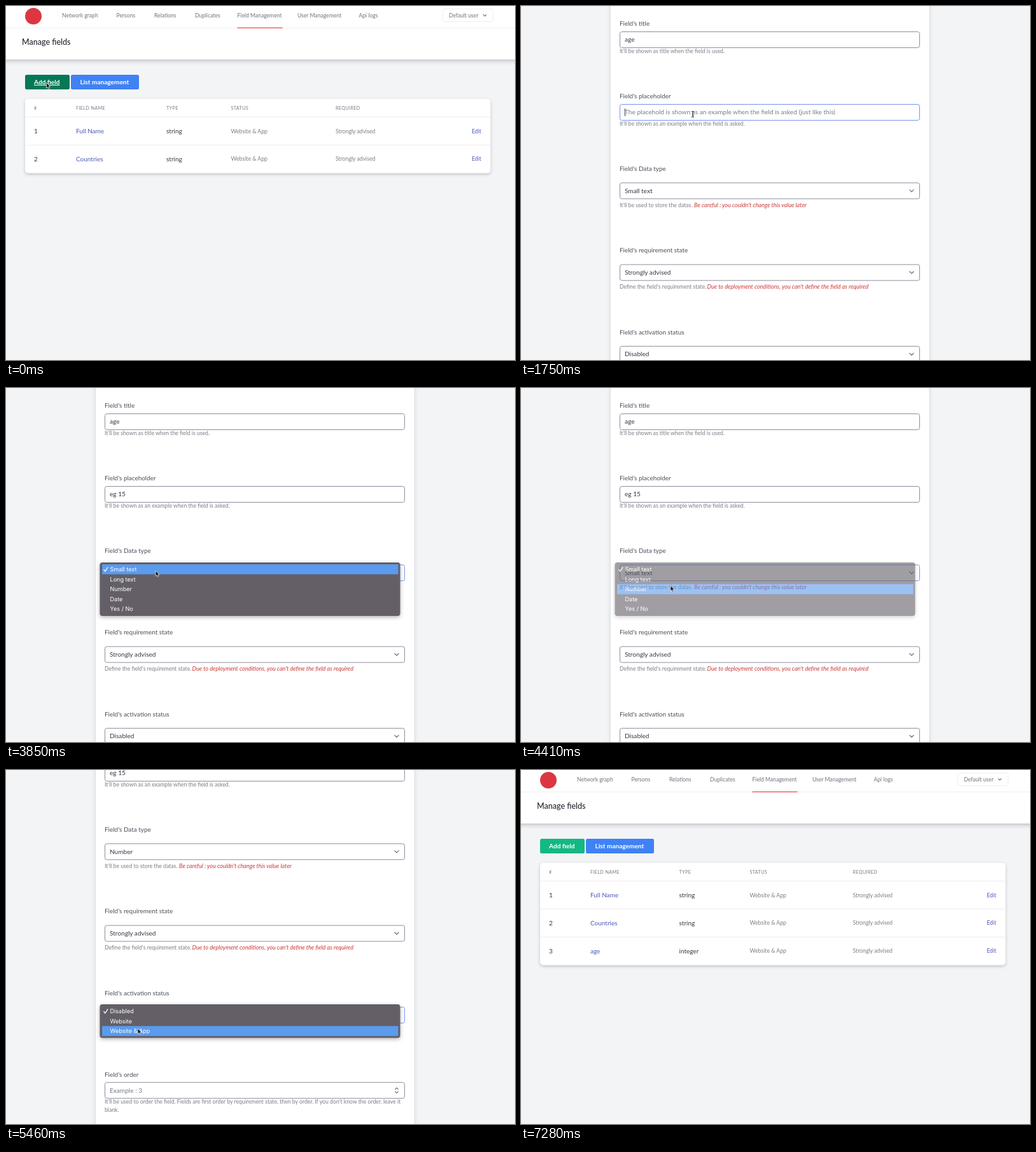
Animation of 800x556 px, one loop 7350 ms. Source, as an HTML page:

```html
<!DOCTYPE html>
<html lang="en">
<head>
<meta charset="utf-8">
<title>Manage fields</title>
<style>
html, body { margin: 0; width: 100%; height: 100%; overflow: hidden; background: #f3f4f6; }
svg { display: block; width: 800px; height: 556px; }
text { font-family: Lato, sans-serif; white-space: pre; }
.menu text { font-family: Inter, sans-serif; }
.card { fill: #fff; filter: drop-shadow(0 2px 2.5px rgba(0,0,0,.2)); }
.soft { fill: #fff; filter: drop-shadow(0 2px 3px rgba(0,0,0,.15)); }
.line { stroke: #edeef1; }
.box { fill: #fff; stroke: #8f8e9e; }
.chev { fill: none; stroke: #5f6672; stroke-width: 1.1; stroke-linecap: round; stroke-linejoin: round; }
</style>
</head>
<body>
<svg id="stage" viewBox="0 0 800 556" xmlns="http://www.w3.org/2000/svg"></svg>
<script>
const LOOP = 7350, STEP = 70;
const INK = '#343a46', LABEL = '#4a4f5a', HINT = '#7b7e87', RED = '#cb3838', LINK = '#4d56c0';
const FOCUS = '#7893ea', PAGE = '#f3f4f6';

// y is the optical middle of the line
const text = (x, y, s, size, fill, more = '') =>
  `<text x="${x}" y="${(y + size * .33).toFixed(2)}" font-size="${size}" fill="${fill}" ${more}>${s.replace(/&/g, '&amp;')}</text>`;
const rect = (x, y, w, h, r, more) =>
  `<rect x="${x}" y="${y}" width="${w}" height="${h}" rx="${r}" ${more}/>`;
const line = (x1, x2, y) => `<path class="line" d="M${x1} ${y}H${x2}"/>`;
const chevron = (x, y, w = 3.2, up = 1) =>
  `<path class="chev" d="M${x - w} ${y - up * w / 2}l${w} ${up * w} ${w} ${-up * w}"/>`;

function header(title) {
  const tabs = [['Network graph', 88], ['Persons', 173.5], ['Relations', 233], ['Duplicates', 297],
    ['Field Management', 363.5], ['User Management', 458], ['Api logs', 554.5]];
  return rect(0, 84, 800, 9, 0, 'fill="url(#shade)"') +
    rect(0, 0, 800, 84, 0, 'fill="#fff"') + line(0, 800, 34.5) +
    '<circle cx="43" cy="16" r="13" fill="#dc3740"/>' +
    tabs.map(([s, x], i) => text(x, i > 3 && i < 6 ? 14.7 : 15.6, s, 8.6, '#70747e')).join('') +
    rect(363.5, 33.6, 71, 1.5, 0, 'fill="#f0605f"') +
    rect(686.5, 4.5, 79, 20, 3, 'fill="#fff" stroke="#eceef1"') +
    text(696, 14.8, 'Default user', 8.6, '#70747e') + chevron(752.5, 14.8, 2.2) +
    text(25, 57, title, 12.5, '#23272f', 'font-weight="500"');
}

function listPage(rows, cols, hover) {
  const h = 29 + rows.length * 43.8;
  const heads = ['#', 'FIELD NAME', 'TYPE', 'STATUS', 'REQUIRED'];
  let s = header('Manage fields') +
    rect(30, 108, 70, 23, 2.5, `fill="${hover ? '#047857' : '#14b884'}"`) +
    text(44, 119.5, 'Add field', 10.1, '#fff', 'font-weight="700"' + (hover ? ' text-decoration="underline"' : '')) +
    rect(102, 108, 107, 23, 2.5, 'fill="#3f82f5"') +
    text(116.5, 119.5, 'List management', 10.1, '#fff', 'font-weight="700"') +
    rect(30, 146, 731.5, h, 5, 'class="card"');
  heads.forEach((t, i) => s += text(cols[i], 160.2, t, 7.2, '#777b85', 'letter-spacing=".36"'));
  rows.forEach(([name, type], i) => {
    const y = 196.7 + i * 43.8;
    s += line(30, 761.5, 174.5 + i * 44) +
      text(44, y, String(i + 1), 10, INK) + text(cols[1], y, name, 10, LINK) +
      text(cols[2], y, type, 10, INK) + text(cols[3], y, 'Website & App', 8.7, HINT) +
      text(cols[4], y, 'Strongly advised', 8.7, HINT) + text(732, y, 'Edit', 8.7, LINK);
  });
  return s;
}

const label = (y, s) => text(155, y, s, 9.95, LABEL);
const hint = (y, s) => text(155, y, s, 8.7, HINT);
const warn = (x, y, s) => text(x, y, s, 9.15, RED, 'font-style="italic"');
const field = (id, y, value, select) =>
  rect(155.5, y, 471, 25, 3, `class="box" id="${id}Box"`) +
  text(163, y + 12.5, value, 10.1, INK, `id="${id}"`) + (select ? chevron(614, y + 12.5) : '');
const check = y => rect(155.6, y - 4.4, 8.8, 8.8, 2.5, 'class="box"');

// Form coordinates: zero offset is the view with the title field on top
const TOP = 122;
const formPage = `<g transform="translate(0 ${-TOP})">${header('Add field')}</g>` +
  rect(141, -14, 500.5, 1004, 5, 'class="soft"') +
  label(28, "Field's title") + field('title', 40.5, '') +
  hint(71.3, "It'll be shown as title when the field is used.") +
  label(142, "Field's placeholder") + field('sample', 154.5, '') +
  hint(185, "It'll be shown as an example when the field is asked.") +
  label(256, "Field's Data type") + field('type', 277.8, 'Small text', 1) +
  hint(313.3, "It'll be used to store the datas.") +
  warn(272, 313.3, "Be careful : you couldn't change this value later") +
  label(384, "Field's requirement state") + field('need', 406.1, 'Strongly advised', 1) +
  hint(441.4, "Define the field's requirement state.") +
  warn(292.5, 441.4, "Due to deployment conditions, you can't define the field as required") +
  label(512.3, "Field's activation status") + field('status', 534.4, 'Disabled', 1) +
  hint(569.8, 'Define where the field will be deployed.') +
  warn(308.5, 569.8, "Be careful, if the status is set to 'Disabled', the field won't be shown.") +
  label(640.6, "Field's order") + field('order', 652.7, '') +
  text(163, 665.2, 'Example : 3', 10.1, '#777b85') +
  chevron(614, 668.3, 2.2) + chevron(614, 662.3, 2.2, -1) +
  hint(683.6, "It'll be used to order the field. Fields are first order by requirement state, then by order. If you don't know the order, leave it") +
  hint(695.8, 'blank.') +
  label(766.5, 'Is that a descriptive value ?') + check(783.4) +
  hint(794, 'If checked, it will be displayed in the Persons section.') +
  label(865, 'Is that the best descriptive value ?') + check(882) +
  hint(892.5, "If checked, it will be displayed as the person's title.") +
  rect(155, 949, 48, 23, 2.5, 'fill="#14b884"') +
  text(168, 960.5, 'Save', 10.1, '#fff', 'font-weight="700"') +
  '<path id="caret" stroke="#222" stroke-width=".9"/>';

const ROW = 15.6;
const menu = (id, y, items) => `<g class="menu" id="${id}">` +
  rect(147.5, y, 472, items.length * ROW + 6, 4, 'fill="#645f67" style="filter:drop-shadow(0 2px 3px rgba(0,0,0,.3))"') +
  rect(151, 0, 465.5, ROW, 0, 'fill="#5a9bee" class="mark"') +
  `<path d="M153.5 ${y + 11}l2.4 3 4.2-6.6" fill="none" stroke="#fff" stroke-width="1.3"/>` +
  items.map((s, i) => text(163.5, y + 10.9 + i * ROW, s, 9.1, '#fff')).join('') + '</g>';

const oldRows = [['Full Name', 'string'], ['Countries', 'string']];
const $ = id => document.getElementById(id);
$('stage').innerHTML =
  `<defs><linearGradient id="shade" x2="0" y2="1"><stop stop-color="#c9cacf"/><stop offset=".45" stop-color="#e4e5e8"/><stop offset="1" stop-color="${PAGE}"/></linearGradient></defs>` +
  rect(0, 0, 800, 556, 0, `fill="${PAGE}"`) +
  `<g id="before">${listPage(oldRows, [44, 110, 252, 353.5, 518], true)}</g>` +
  `<g id="after">${listPage([...oldRows, ['age', 'integer']], [44, 109, 248.5, 359.5, 521.5], false)}</g>` +
  `<g id="form">${formPage}</g>` +
  menu('typeMenu', 274, ['Small text', 'Long text', 'Number', 'Date', 'Yes / No']) +
  menu('statusMenu', 368, ['Disabled', 'Website', 'Website & App']) +
  '<path id="arrow" d="M0 0V8.6L2 6.8 3.4 9.8 4.9 9.1 3.5 6.2H6.2Z" fill="#111" stroke="#fff" stroke-width=".7"/>' +
  '<path id="beam" d="M-2 -4.6Q0 -4.6 0 -3.4Q0 -4.6 2 -4.6M0 -3.4V3.4M-2 4.6Q0 4.6 0 3.4Q0 4.6 2 4.6M-1.2 1.6H1.2" fill="none" stroke="#222" stroke-width="1"/>';

const scroll = [[0, TOP], [1330, TOP], [1540, 0], [4690, 0], [4970, -162], [5740, -162], [6090, -332], [6230, -332], [6510, -454]];
const mouse = [[0, 63.5, 120.5], [280, 63.5, 120.5], [600, 250, 175], [1330, 250, 175], [1600, 270, 170],
  [2940, 270, 170], [3150, 270.7, 169], [3640, 235, 287], [3850, 235, 287], [4200, 235, 310.5], [4690, 235, 310.5],
  [5020, 212, 379], [5180, 212, 379], [5390, 207, 406], [5670, 207, 406], [5950, 432, 396.5], [6300, 432, 396.5], [6640, 180, 505]];

const ease = p => p * p * (3 - 2 * p);
function at(keys, t) {
  const i = keys.findIndex(k => k[0] > t);
  if (i < 0) return keys[keys.length - 1].slice(1);
  const a = keys[i - 1], b = keys[i], p = ease((t - a[0]) / (b[0] - a[0]));
  return a.slice(1).map((v, n) => v + (b[n + 1] - v) * p);
}
const typed = (s, times, t) => s.slice(0, times.filter(k => t >= k).length);
const show = (id, on) => $(id).setAttribute('visibility', on ? 'visible' : 'hidden');

function setInput(id, value, placeholder) {
  $(id).textContent = value || placeholder;
  $(id).setAttribute('fill', value ? INK : '#777b85');
}

function setMenu(id, y, count, open, close, t, my) {
  const alpha = t < open ? 0 : Math.max(0, Math.min(1, (close + 150 - t) / 150));
  $(id).setAttribute('opacity', alpha);
  show(id, alpha > 0);
  const row = Math.max(0, Math.min(count - 1, Math.floor((my - y - 3) / ROW)));
  $(id).querySelector('.mark').setAttribute('y', y + 3 + row * ROW);
}

function draw(t) {
  const inForm = t >= 210 && t < 6960;
  show('before', t < 210);
  show('form', inForm);
  show('after', t >= 6960);
  $('form').setAttribute('transform', `translate(0 ${at(scroll, t)[0].toFixed(2)})`);

  const title = typed('age', [840, 980, 1120], t);
  const sample = typed('eg 15', [2450, 2590, 2660, 2870, 3010], t);
  setInput('title', title, 'The title of the field');
  setInput('sample', sample, 'The placehold is shown as an example when the field is asked (just like this)');
  $('type').textContent = t < 4480 ? 'Small text' : 'Number';
  $('status').textContent = t < 5670 ? 'Disabled' : 'Website & App';

  const focus = t < 700 ? '' : t < 1680 ? 'title' : t < 3710 ? 'sample' : t < 5110 ? 'type' : 'status';
  for (const id of ['title', 'sample', 'type', 'status'])
    $(id + 'Box').style.stroke = id === focus ? FOCUS : '';

  const value = focus === 'title' ? title : sample;
  const blink = t >= 2170 && t < 2450;
  const caretOn = inForm && (focus === 'title' || focus === 'sample') && !blink;
  show('caret', caretOn);
  if (caretOn) {
    const x = 163.4 + (value ? $(focus).getComputedTextLength() : 0);
    $('caret').setAttribute('d', `M${x.toFixed(2)} ${focus === 'title' ? 47 : 161}v12`);
  }

  const [mx, my] = at(mouse, t);
  setMenu('typeMenu', 274, 5, 3780, 4350, t, my);
  setMenu('statusMenu', 368, 3, 5110, 5530, t, my);
  const beam = t >= 560 && t < 3260;
  show('beam', beam);
  show('arrow', !beam && t < 6960);
  for (const id of ['beam', 'arrow'])
    $(id).setAttribute('transform', `translate(${mx.toFixed(2)} ${my.toFixed(2)})`);
}

const start = performance.now();
function tick() {
  const t = (performance.now() - start) % LOOP;
  draw(Math.floor(t / STEP) * STEP);
  requestAnimationFrame(tick);
}
tick();
</script>
</body>
</html>
```
